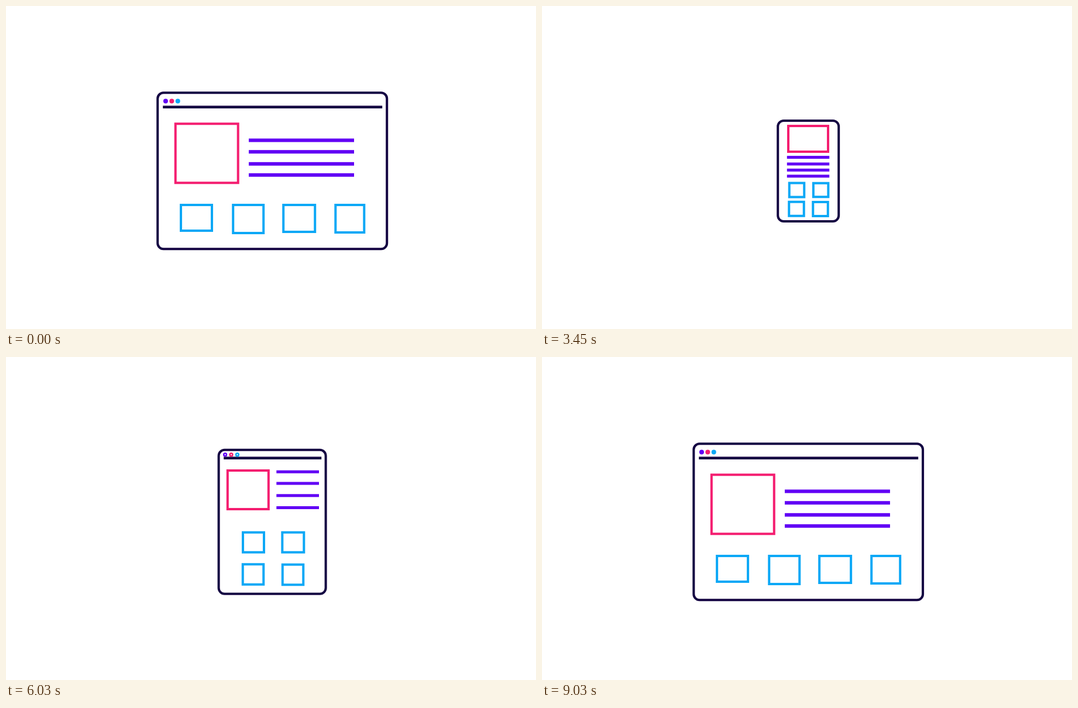
An HTML page with a canvas that plays this animation: 906 px wide and 552 px high, repeating every 9060 ms.

```html
<!DOCTYPE html>
<html lang="en">
<head>
<meta charset="utf-8">
<title>Responsive layout</title>
<style>
html, body { margin: 0; width: 100%; height: 100%; overflow: hidden; background: #fff; }
canvas { display: block; }
</style>
</head>
<body>
<canvas id="stage" width="906" height="552"></canvas>
<script>
const ctx = document.getElementById('stage').getContext('2d');
const NAVY = '#140442', PINK = '#f41e70', PURPLE = '#6100f5', CYAN = '#0ca8f6';
const CYCLE = 4530, STEP = 30;

// Boxes are [centre x, centre y, width, height], measured to the outer edge.
const desktop = {
  win: [455.2, 281.8, 396, 271],
  hero: [343.2, 251.8, 111, 105],
  text: [415, 595, 6], rows: [229.5, 249.2, 269.8, 288.8],
  cards: [[325.5, 362, 57, 48], [414.2, 364, 56, 52], [501.2, 363, 58, 50], [587.8, 363.5, 53, 51]],
  dots: [272.9, 162.5], bar: [455.7, 375]
};
const tablet = {
  win: [455.1, 281.8, 187, 250],
  hero: [413.8, 227, 74, 70],
  text: [462.3, 535, 5], rows: [196.2, 216, 236.8, 257.5],
  cards: [[423, 316.8, 40, 38], [490.8, 316.8, 41, 38], [422.5, 371.5, 39.5, 38.5], [490.5, 372, 39.5, 38.5]],
  dots: [374.6, 166.9], bar: [455.7, 167]
};
const phone = {
  win: [455.2, 282, 108, 176],
  hero: [455, 227, 72, 48],
  text: [418.8, 491.2, 5], rows: [258.6, 270, 280.4, 290.8],
  cards: [[435.5, 314.5, 29.5, 28], [476.6, 314.5, 29.5, 27.5], [435, 346.8, 29.5, 28], [476, 347, 29.5, 28]],
  dots: [374.6, 166.9], bar: [455.7, 0]
};

const lerp = (a, b, k) => a + (b - a) * k;
const linear = (t, start, end) => Math.min(1, Math.max(0, (t - start) / (end - start)));
function ease(t, start, end) {
  const u = linear(t, start, end);
  return u < 0.5 ? 4 * u ** 3 : 1 - 4 * (1 - u) ** 3;
}
function mix(a, b, k) {
  if (typeof a === 'number') return lerp(a, b, k);
  if (Array.isArray(a)) return a.map((v, i) => mix(v, b[i], k));
  return Object.fromEntries(Object.keys(a).map(n => [n, mix(a[n], b[n], k)]));
}

function pose(t) {
  let s;
  if (t < 2000) {
    s = mix(desktop, tablet, ease(t, 320, 1120));
    const k = linear(t, 270, 1200);
    for (const n of ['win', 'hero']) s[n][3] = lerp(desktop[n][3], tablet[n][3], k);
    s.dotSize = lerp(4, 3.6, ease(t, 880, 1120));
    s.hole = 1.1 * ease(t, 880, 1120);
  } else if (t < 3900) {
    s = mix(tablet, phone, ease(t, 2430, 2930));
    s.bar = mix(tablet.bar, phone.bar, ease(t, 2240, 2740));
    const k = 1 - ease(t, 2200, 2600);
    s.dotSize = 3.6 * k;
    s.hole = 1.1 * k;
  } else {
    s = mix(phone, desktop, ease(t, 4030, 4530));
    s.bar = mix(phone.bar, desktop.bar, ease(t, 4015, 4515));
    s.dots = desktop.dots;
    s.dotSize = 4 * ease(t, 4360, 4500);
    s.hole = 0;
  }
  return s;
}

function box([cx, cy, w, h], color, radius = 0) {
  ctx.strokeStyle = color;
  ctx.lineWidth = 4;
  ctx.beginPath();
  ctx.roundRect(cx - w / 2 + 2, cy - h / 2 + 2, w - 4, h - 4, radius);
  ctx.stroke();
}
function line(x0, x1, y, thick, color) {
  ctx.fillStyle = color;
  ctx.fillRect(x0, y - thick / 2, x1 - x0, thick);
}
function disc(x, y, r, color) {
  ctx.fillStyle = color;
  ctx.beginPath();
  ctx.arc(x, y, r, 0, Math.PI * 2);
  ctx.fill();
}

function draw(t) {
  const s = pose(t);
  ctx.fillStyle = '#fff';
  ctx.fillRect(0, 0, 906, 552);
  box(s.win, NAVY, 10);
  const [mid, width] = s.bar;
  line(mid - width / 2, mid + width / 2, 172.7, 4.6, NAVY);
  [PURPLE, PINK, CYAN].forEach((color, i) => {
    const x = s.dots[0] + i * 10.4;
    disc(x, s.dots[1], s.dotSize, color);
    disc(x, s.dots[1], s.hole, '#fff');
  });
  box(s.hero, PINK);
  const [x0, x1, thick] = s.text;
  s.rows.forEach(y => line(x0, x1, y, thick, PURPLE));
  s.cards.forEach(c => box(c, CYAN));
}

function tick() {
  const t = performance.now() % CYCLE;
  draw(Math.floor(t / STEP) * STEP);
  requestAnimationFrame(tick);
}
tick();
</script>
</body>
</html>
```
